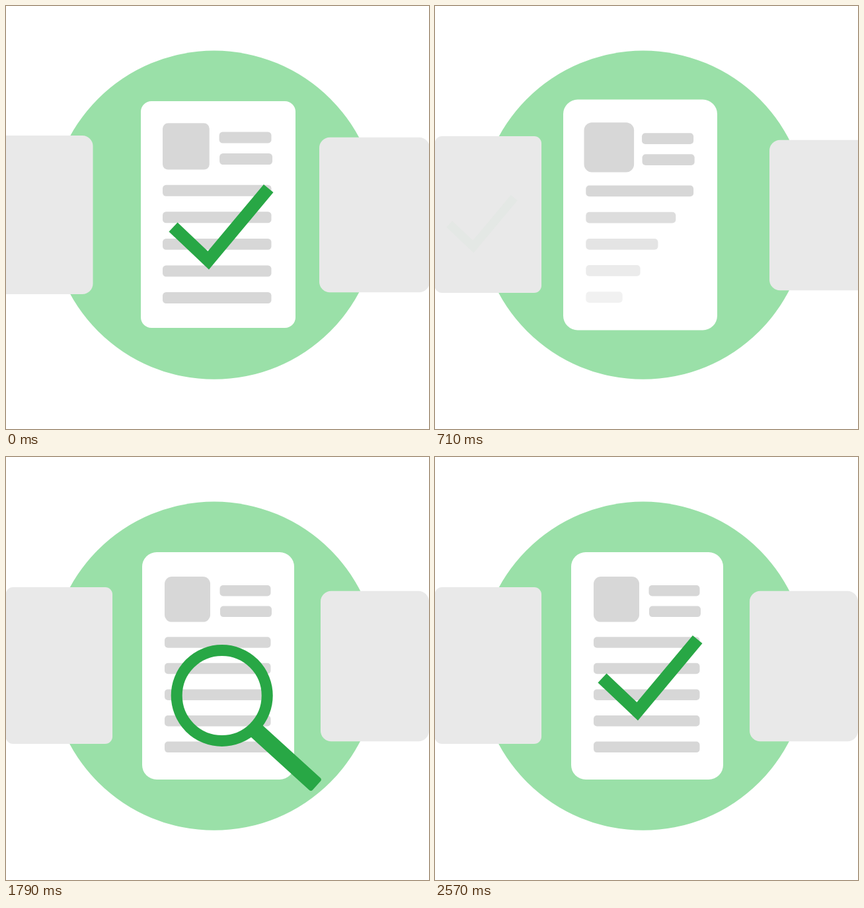
An HTML page for the animation above (2.87 s loop, 640 by 640 pixels).

```html
<!DOCTYPE html>
<html lang="en">
<head>
<meta charset="utf-8">
<title>Document review</title>
<style>
html, body { margin: 0; width: 100%; height: 100%; overflow: hidden; background: #fff; }
svg { display: block; width: 100vw; height: 100vh; }
</style>
</head>
<body>
<svg id="stage" viewBox="0 0 640 640"></svg>
<script>
const LOOP = 2870;
const GREEN = "#28a745";
const CHECK = "M253 334.5L306.2 384.8L397.2 276";
const stage = document.getElementById("stage");

function set(el, attrs) {
  for (const k in attrs) el.setAttribute(k, attrs[k]);
}
function add(parent, tag, attrs = {}) {
  const el = document.createElementNS("http://www.w3.org/2000/svg", tag);
  set(el, attrs);
  parent.append(el);
  return el;
}
const group = () => add(stage, "g");
const card = () => add(stage, "rect");
const check = parent =>
  add(parent, "path", { d: CHECK, fill: "none", stroke: GREEN, "stroke-width": 19, pathLength: 1 });

// Page contents: a photo, two short lines beside it, five long lines below.
function sheet(photoRadius) {
  const el = group();
  const bar = (x, y, width, height, rx) =>
    add(el, "rect", { x, y, width, height, rx, fill: "#d7d7d7" });
  const photo = bar(240, 181, 69, 68.6, photoRadius);
  const lines = [];
  for (let i = 0; i < 2; i++) lines.push(bar(323.5 + i / 2, 194 + 31.6 * i, 77 + i, 16.5, 5));
  for (let i = 0; i < 5; i++) lines.push(bar(240, 272.2 + 39.6 * i, 160.5, 16.5, 5));
  return { el, photo, lines };
}

// Card poses: centre, size, grey level, corner radius.
const pose = (x, y, w, h, grey, rx) => ({ x, y, w, h, grey, rx });
const CENTRE = pose(321, 315.5, 234, 343, 255, 16);
const LEFT = pose(80.3, 315.5, 161.5, 237, 233, 11);
const RIGHT = pose(557.5, 316, 167, 234.5, 233, 16);
const OVER = pose(310.5, 316, 233, 349, 255, 22);
const REST = pose(321, 316, 230, 344, 255, 22);
const GONE = pose(51.5, 316, 160, 240, 233, 16);
const NEXT = pose(558, 316.5, 164, 227.5, 233, 16);

const clamp = u => Math.max(0, Math.min(1, u));
const mix = (a, b, u) => a + (b - a) * u;
const ramp = (t, from, to) => clamp((t - from) / (to - from));
// Smooth 0 to 1 between two times; a bend above 1 starts later.
function ease(t, from, to, bend = 1) {
  const u = ramp(t, from, to) ** bend;
  return u * u * (3 - 2 * u);
}
const blend = (a, b, u) =>
  Object.fromEntries(Object.keys(a).map(k => [k, mix(a[k], b[k], u)]));
const about = (x, y, s, ox, oy) => `translate(${x} ${y}) scale(${s}) translate(${-ox} ${-oy})`;

function place(el, { x, y, w, h, grey, rx }) {
  const c = Math.round(grey);
  set(el, { x: x - w / 2, y: y - h / 2, width: w, height: h, rx, fill: `rgb(${c},${c},${c})` });
}

// Lens moves: start time, end time, where it stops.
const MOVES = [
  [790, 1140, 325, 206], [1140, 1210, 282, 328], [1210, 1290, 363, 215],
  [1360, 1430, 278.5, 308], [1430, 1640, 283.5, 315],
  [1710, 1790, 326.7, 361], [1790, 2140, 366, 420],
  [2210, 2290, 439, 457], [2290, 2430, 720, 690]
];
function lensAt(t) {
  let x = 760, y = 470;
  for (const [from, to, nx, ny] of MOVES) {
    const u = 1 - (1 - ramp(t, from, to)) ** 1.7;
    x = mix(x, nx, u);
    y = mix(y, ny, u);
  }
  return [x, y];
}

add(stage, "circle", { cx: 315, cy: 316.2, r: 248.6, fill: "#9ae0a8" });
const gone = card(), next = card(), old = card();
const oldSheet = sheet(8);
const oldCheck = group();
check(oldCheck);
const page = card();
const newSheet = sheet(11);
const widths = newSheet.lines.map(el => +el.getAttribute("width"));
const mark = check(stage);
const lens = group();
add(lens, "circle", { r: 68.5, fill: "none", stroke: GREEN, "stroke-width": 17 });
add(lens, "rect", {
  x: -6, y: -12.5, width: 128, height: 25, rx: 4, fill: GREEN,
  transform: "translate(53 54) rotate(42.3)"
});

function drawOld(t) {
  const move = ease(t, 0, 570, 1.09), shrink = ease(t, 0, 570, 1.31);
  place(gone, { ...GONE, x: GONE.x - 320 * move });
  place(old, { ...blend(CENTRE, LEFT, shrink), x: mix(CENTRE.x, LEFT.x, move) });
  set(oldSheet.el, {
    transform: about(mix(319, 72, move), 313.6, mix(1.025, .7, shrink), 320, 314),
    opacity: 1 - ease(t, 290, 570)
  });
  set(oldCheck, {
    transform: about(mix(325.5, 71, move), mix(334, 329.5, move), mix(1, .68, move), 325.5, 334),
    opacity: 1 - ease(t, 0, 790)
  });
}

function drawNew(t) {
  const settle = ease(t, 710, 860);
  const p = blend(blend(RIGHT, OVER, ease(t, 0, 710, 1.06)), REST, settle);
  place(page, p);
  place(next, { ...NEXT, x: NEXT.x + 30 * Math.max(0, (860 - t) / 150) ** 2 });

  set(newSheet.el, { transform: about(p.x, p.y, p.h / REST.h, REST.x, REST.y) });
  const pop = 1.08 * ease(t, 570, 710) - .08 * settle;
  set(newSheet.photo, { transform: about(274.5, 215, pop, 274.5, 215) });
  const reveal = Math.max(0, (t - 570) / 140);
  newSheet.lines.forEach((el, i) => {
    const part = clamp(reveal - .165 * Math.max(0, i - 2));
    set(el, { width: widths[i] * part, opacity: part });
  });
}

function draw(t) {
  drawOld(t);
  drawNew(t);
  const drawn = ramp(t, 2360, 2570);
  set(mark, { "stroke-dasharray": `${drawn} 2`, visibility: drawn ? "visible" : "hidden" });
  set(lens, { transform: `translate(${lensAt(t)})` });
}

// The picture holds between ticks, about 14 per second.
const ticks = Array.from({ length: 37 }, (_, k) => Math.round((71.4 * k + .9) / 10) * 10);
const start = performance.now();
let shown = -1;
function frame() {
  const t = (performance.now() - start) % LOOP;
  const tick = ticks.findLast(v => v <= t) ?? 0;
  if (tick !== shown) draw(shown = tick);
  requestAnimationFrame(frame);
}
frame();
</script>
</body>
</html>
```
